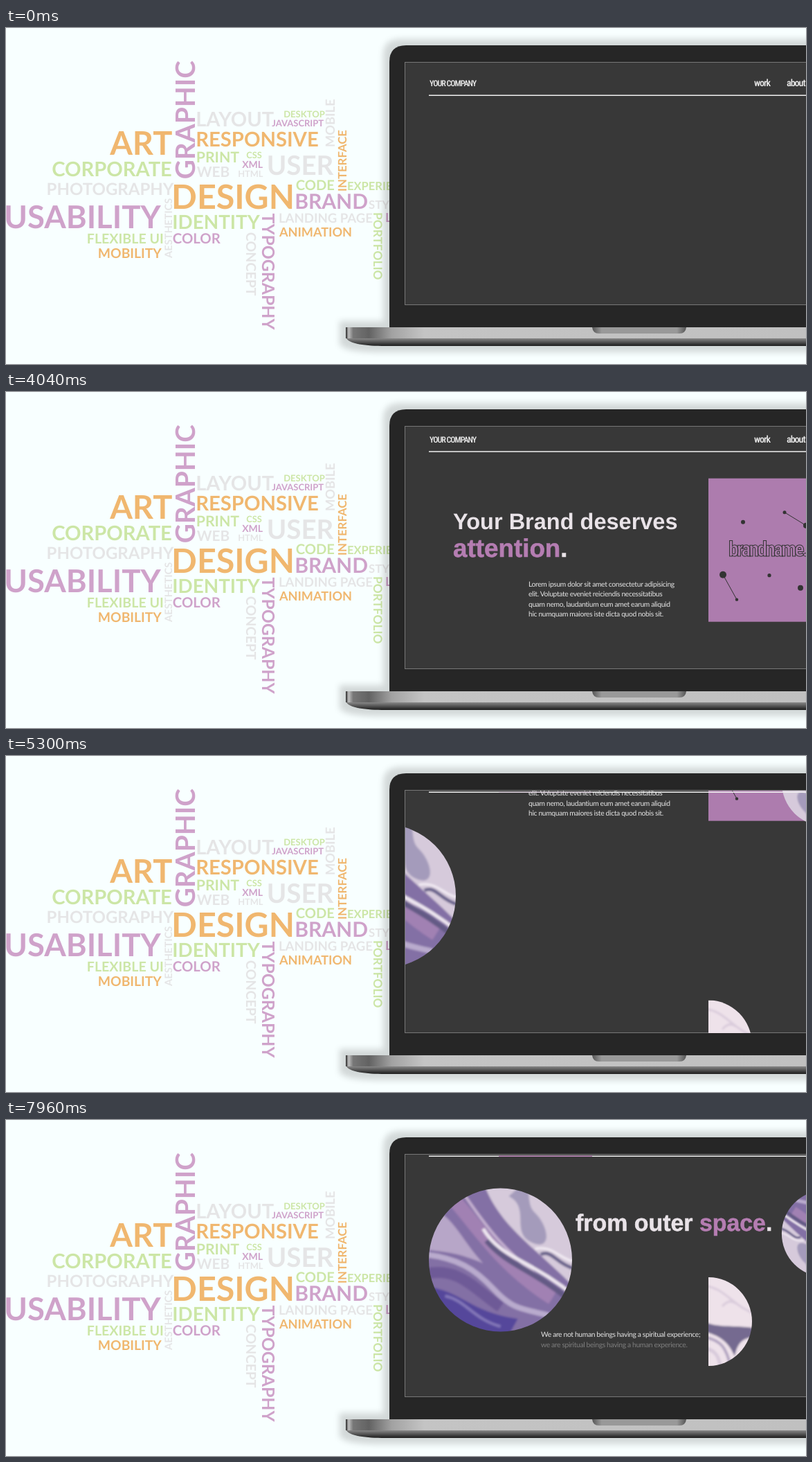
An HTML page for the animation above (8 s loop, 1156 px wide and 485 px high).

```html
<!DOCTYPE html>
<html lang="en">
<head>
<meta charset="utf-8">
<title>Design studio landing page</title>
<style>
  html, body { margin: 0; width: 100%; height: 100%; overflow: hidden; background: #f8ffff; }
  svg { display: block; width: 1156px; height: 485px; text-rendering: geometricPrecision; }
  #cloud { font: 700 16px Lato, sans-serif; }
  .nav { font-family: "Roboto Condensed", Roboto, sans-serif; font-stretch: 75%; fill: #eee; letter-spacing: -1px; }
  .head { font: 700 32.5px "Liberation Sans", Arial, sans-serif; fill: #e9e3e8; }
  .heavy { stroke: #e9e3e8; stroke-width: .6px; }
  .copy { font: 10.3px Lato, sans-serif; letter-spacing: -.34px; fill: #e4e4e4; }
  .accent { fill: #b57db2; }
  .heavy .accent { stroke: #b57db2; }
</style>
</head>
<body>
<svg viewBox="0 0 1156 485">
  <defs>
    <linearGradient id="metal" gradientUnits="userSpaceOnUse" x1="491" x2="1156">
      <stop offset="0" stop-color="#222"/>
      <stop offset=".006" stop-color="#c0c0c0"/>
      <stop offset=".016" stop-color="#777"/>
      <stop offset=".05" stop-color="#626262"/>
      <stop offset=".1" stop-color="#a2a2a2"/>
      <stop offset=".17" stop-color="#c4c4c4"/>
      <stop offset="1" stop-color="#c0c0c0"/>
    </linearGradient>
    <linearGradient id="under" x2="0" y2="1">
      <stop offset=".55" stop-color="#8a8a8a"/>
      <stop offset="1" stop-color="#1c1c1c"/>
    </linearGradient>
    <linearGradient id="notch">
      <stop offset="0" stop-color="#555"/>
      <stop offset=".1" stop-color="#999"/>
      <stop offset=".9" stop-color="#999"/>
      <stop offset="1" stop-color="#555"/>
    </linearGradient>
    <filter id="halo" filterUnits="userSpaceOnUse" x="440" y="0" width="760" height="485">
      <feMorphology in="SourceAlpha" operator="dilate" radius="9"/>
      <feGaussianBlur stdDeviation="4.5" result="wide"/>
      <feFlood flood-opacity=".15"/>
      <feComposite in2="wide" operator="in" result="glow"/>
      <feMerge><feMergeNode in="glow"/><feMergeNode in="SourceGraphic"/></feMerge>
    </filter>
    <filter id="soft"><feGaussianBlur stdDeviation="1.6"/></filter>
    <clipPath id="screen"><path d="M577,50H1156V400H577z"/></clipPath>
    <clipPath id="disc"><circle r="103.5"/></clipPath>
    <clipPath id="halfDisc"><path d="M0,-64a63,64 0 0 1 0,128z"/></clipPath>

    <g id="marble" clip-path="url(#disc)">
      <g fill="none" filter="url(#soft)">
        <circle r="112" fill="#836fa5"/>
        <path fill="#d6cadb" d="M-25,-112C0,-45 50,-20 112,45V-112z"/>
        <path fill="#a49bbb" d="M12,-92C45,-75 12,-38 48,-24C75,-14 70,-50 48,-70C38,-82 45,-95 35,-112z"/>
        <path fill="#b7a6c8" d="M-112,-70C-75,-80 -62,-35 -25,5C-60,-10 -80,-12 -112,-15z"/>
        <path stroke="#a181b3" stroke-width="20" d="M-75,-95C-40,-60 -5,5 75,55"/>
        <path stroke="#c4b0d0" stroke-width="4" d="M-55,-98C-25,-55 0,-15 70,35"/>
        <path stroke="#635a85" stroke-width="8" d="M-20,-28C10,8 50,15 105,62"/>
        <path stroke="#eee7f0" stroke-width="5" d="M-25,-45C0,-2 45,0 108,53"/>
        <path stroke="#6b648c" stroke-width="5" d="M58,-8C75,-15 80,5 105,12"/>
        <path stroke="#f3edf4" stroke-width="3" d="M50,-16C75,-22 85,-2 105,2"/>
        <path stroke="#b9abcd" stroke-width="8" d="M-108,-8C-62,-2 -38,12 -10,42S30,70 70,80"/>
        <path stroke="#6e5a97" stroke-width="16" d="M-108,20C-60,10 -40,40 0,68"/>
        <path fill="#55479b" d="M-108,38C-55,45 -45,75 25,85L10,112H-70z"/>
        <path stroke="#8377b8" stroke-width="4" d="M-80,52C-50,58 -40,85 0,96"/>
      </g>
    </g>
  </defs>

  <g id="cloud"></g>

  <g filter="url(#halo)">
    <path fill="#282828" d="M554,436V49Q554,25 578,25H1300V436z"/>
    <path fill="url(#under)" d="M491,434H1300V459H548C520,459 495,456 491,447z"/>
    <path fill="url(#metal)" d="M491,432H1300V448H491z"/>
    <path fill="url(#notch)" d="M847,432H983q-1,9 -10,9H857q-9,0 -10,-9z"/>
  </g>
  <rect x="576.5" y="49.5" width="600" height="350" fill="#383838" stroke="#777"/>

  <g clip-path="url(#screen)">
    <g id="page">
      <g class="nav" font-weight="500">
        <text x="612" y="84" font-size="12">YOUR COMPANY</text>
        <text x="1081" y="84" font-size="14">work</text>
        <text x="1128" y="84" font-size="14">about</text>
      </g>
      <rect id="card" x="1015" y="136" width="207" height="207" fill="#ad7cae"/>
      <g id="logo" fill="#333" stroke="#333">
        <path d="M1125,185L1156,204M1036,275L1056,311"/>
        <g id="dots" stroke="none"></g>
        <text class="nav" x="1044" y="248" font-size="30" font-weight="700" style="fill:none;letter-spacing:-3px">brandname.</text>
      </g>
      <g id="headline" class="head">
        <text x="646" y="209">Your Brand deserves</text>
        <text class="heavy" x="646" y="249" style="font-size:36.8px"><tspan class="accent">attention</tspan>.</text>
      </g>
      <g id="lorem" class="copy">
        <text x="755" y="292">Lorem ipsum dolor sit amet consectetur adipisicing</text>
        <text x="755" y="306.5">elit. Voluptate eveniet reiciendis necessitatibus</text>
        <text x="755" y="321">quam nemo, laudantium eum amet earum aliquid</text>
        <text x="755" y="335.5">hic numquam maiores iste dicta quod nobis sit.</text>
      </g>
    </g>

    <g id="left"><use href="#marble" x="714.5" y="202"/></g>
    <g id="right"><use href="#marble" transform="translate(1183.5 164) scale(.605) rotate(180)"/></g>
    <g id="half">
      <g transform="translate(1015 291)" clip-path="url(#halfDisc)">
        <g fill="none" filter="url(#soft)">
          <path fill="#eee2ea" d="M-8,-72H72V72H-8z"/>
          <path stroke="#d9cbdb" stroke-width="3" d="M-8,-52C25,-50 35,-20 72,-10M20,-22q10,-12 20,-4"/>
          <path fill="#746a90" d="M-8,0C18,10 34,4 72,10V22C48,22 42,32 38,50C28,28 16,20 -8,14z"/>
          <path stroke="#b0a2c0" stroke-width="4" d="M-8,22C20,26 26,40 32,64"/>
          <path stroke="#d8cadb" stroke-width="5" d="M-8,38C10,40 16,50 18,70"/>
        </g>
      </g>
    </g>

    <g id="rule" fill="#f2f2f2">
      <path d="M611,96.5H1156V98H611z"/>
      <path id="mark" class="accent" d="M712,96.5H847V98H712z"/>
    </g>

    <text id="space" class="head heavy" x="823" y="160" style="font-size:33.9px">from outer <tspan class="accent">space</tspan>.</text>
    <text id="quote1" class="copy" x="773" y="313">We are not human beings having a spiritual experience;</text>
    <text id="quote2" class="copy" x="773" y="328">we are spiritual beings having a human experience.</text>
  </g>
</svg>

<script>
const $ = id => document.getElementById(id);
const purple = '#cfa2ca', orange = '#f0b76f', green = '#cce6a6', grey = '#e5e5e6';

// text, x, baseline y, size; a fifth value is the rotation
const cloud = {
  [purple]: [
    ['GRAPHIC', 273, 216, 38.8, -90], ['JAVASCRIPT', 385, 142, 13], ['XML', 342, 202, 14],
    ['USABILITY', 0, 289, 45.4], ['BRAND', 419, 261, 30], ['COLOR', 242, 311, 20.3],
    ['TYPOGRAPHY', 370, 269, 24.8, 90], ['LOGO', 549, 280, 18],
  ],
  [orange]: [
    ['ART', 153, 183, 47], ['RESPONSIVE', 276, 171, 29.2], ['INTERFACE', 492, 235, 16.8, -90],
    ['DESIGN', 242, 261, 48.4], ['ANIMATION', 396, 301, 18.1], ['MOBILITY', 134, 332, 19.3],
  ],
  [green]: [
    ['DESKTOP', 402, 129, 13], ['CORPORATE', 68, 214, 29.1], ['PRINT', 276, 194, 21.3],
    ['CSS', 348, 188, 12.8], ['CODE', 420, 234, 20.1], ['EXPERIENCE', 494, 234, 16.5],
    ['IDENTITY', 242, 290, 27.8], ['FLEXIBLE UI', 118, 311, 19.6], ['PORTFOLIO', 531, 267, 17.3, 90],
  ],
  [grey]: [
    ['LAYOUT', 276, 142, 29], ['MOBILE', 475, 171, 18.3, -90], ['HTML', 336, 215, 12.8],
    ['WEB', 277, 215, 20.8], ['USER', 379, 212, 38.5], ['PHOTOGRAPHY', 60, 241, 24],
    ['STYLE', 525, 261, 16.7], ['AESTHETICS', 240, 331, 14.7, -90],
    ['LANDING PAGE', 395, 281, 18.6], ['CONCEPT', 347, 296, 19.6, 90],
  ],
};
const word = ([text, x, y, size, turn = 0]) =>
  `<text x="${-size * .06}" font-size="${size}" transform="translate(${x} ${y}) rotate(${turn})">${text}</text>`;
$('cloud').innerHTML = Object.entries(cloud)
  .map(([color, words]) => `<g fill="${color}">${words.map(word).join('')}</g>`).join('');

$('dots').innerHTML = [
  [1065, 199, 3], [1125, 185, 2.5], [1156, 204, 4], [1036, 275, 5],
  [1056, 311, 2.2], [1103, 276, 2.6], [1148, 294, 4],
].map(([x, y, r]) => `<circle cx="${x}" cy="${y}" r="${r}"/>`).join('');

const clamp = (v, lo, hi) => Math.min(hi, Math.max(lo, v));
const move = (id, x, y) => $(id).setAttribute('transform', `translate(${x} ${y})`);
const fade = (id, value) => $(id).setAttribute('opacity', value);

function draw(t) {
  // progress 0..1 in 60 ms steps, the first one taken at `start`
  const steps = (start, count) => clamp(Math.floor((t - start) / 60) + 1, 0, count) / count;

  fade('card', steps(200, 4));
  fade('logo', steps(740, 5));
  move('headline', -393 * (1 - steps(1840, 7)), 0);
  fade('lorem', steps(3200, 4));

  const scrolled = steps(4040, 30), offset = 340 * scrolled, left = 30 * (1 - scrolled);
  move('page', 0, -offset);
  move('rule', 0, -Math.min(offset, 45));
  move('left', -21 * left, 0);
  move('right', 0, -15.7 * left);
  move('half', 0, 15.7 * left);

  fade('mark', clamp((t - 5000) / 1320, 0, 1));
  fade('space', steps(6500, 5));
  fade('quote1', steps(7200, 5));
  fade('quote2', steps(7900, 5));
}

function frame() {
  draw(performance.now() % 8000);
  requestAnimationFrame(frame);
}
frame();
</script>
</body>
</html>
```
